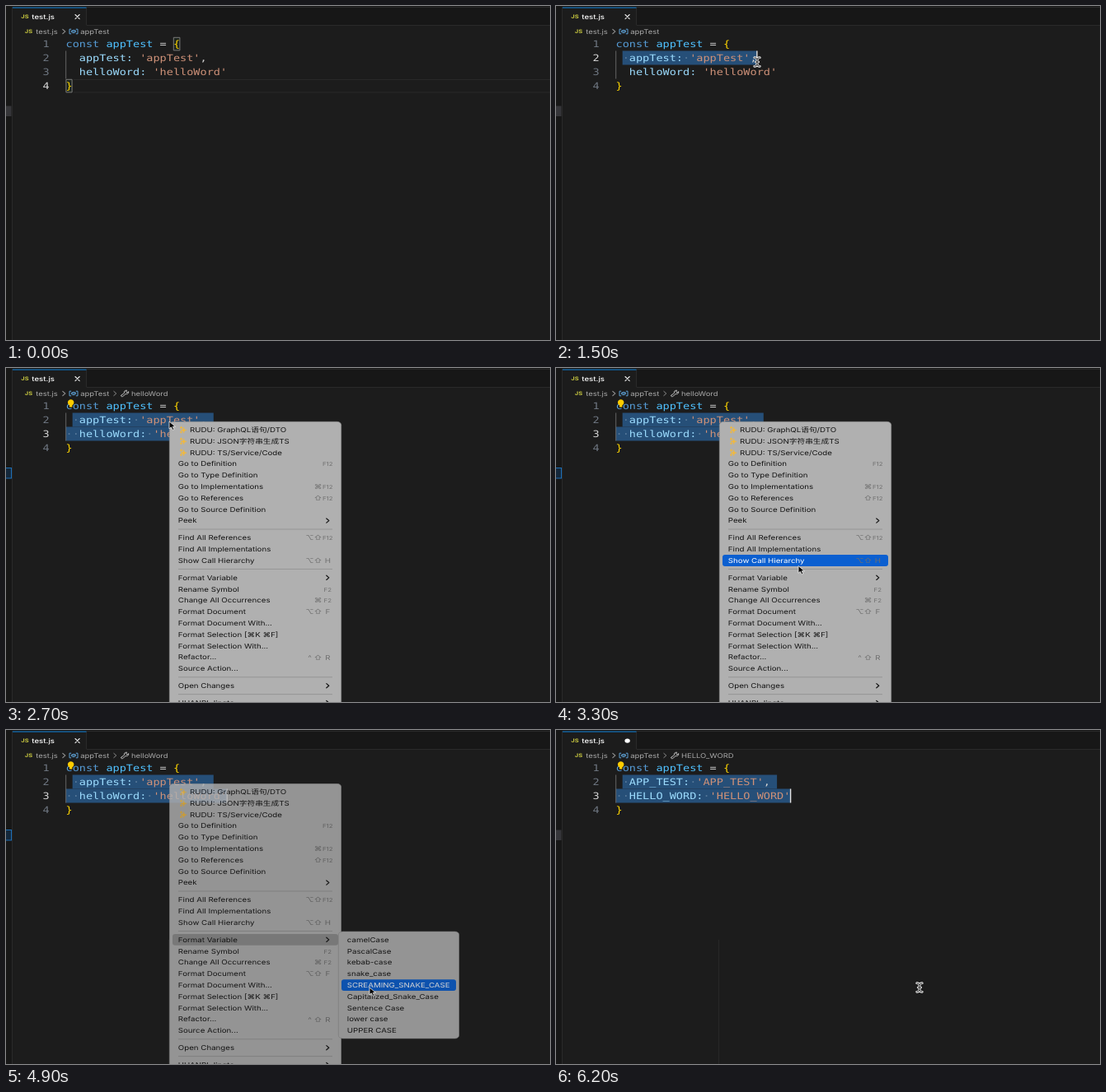
Animation of 660x406 px, one loop 6400 ms. Source, as an HTML page:

```html
<!DOCTYPE html>
<html lang="zh-CN">
<head>
<meta charset="utf-8">
<title>Format variable</title>
<style>
  html, body { margin: 0; width: 100%; height: 100%; overflow: hidden; background: #1c1c1c; }
  svg { display: block; width: 660px; height: 406px; }
  text { font: 400 8.15px Inter, "Noto Sans CJK SC", "Noto Sans CJK", "DejaVu Sans", sans-serif;
    fill: #141414; white-space: pre; text-rendering: geometricPrecision; }
  .code { font: 400 11.33px "DejaVu Sans Mono", monospace; }
  .js { font-size: 6.3px; font-weight: 700; fill: #cbcb41; }
  .tab { font-weight: 500; fill: #fff; font-size: 8px; }
  .crumb { fill: #a9a9a9; font-size: 7.9px; }
  .num { fill: #6e7681; }
  .num.on { fill: #d6d6d6; }
  .kw { fill: #569cd6; }
  .const { fill: #4fc1ff; }
  .op { fill: #d4d4d4; }
  .brace { fill: #ffd700; }
  .key { fill: #9cdcfe; }
  .str { fill: #ce9178; }
  .dot { fill: #9fb4c8; opacity: .45; }
  .keycap { fill: #6f6f6f; }
  .small { font-size: 6.6px; }
  .light { fill: #fff; }
  .line { fill: none; stroke-linecap: round; stroke-linejoin: round; }
  .panel { fill: #b0b0b0; stroke: #8b8b8b; stroke-width: .6; }
</style>
</head>
<body>
<svg viewBox="0 0 660 406">
  <rect width="660" height="406" fill="#1c1c1c"/>
  <rect width="660" height="23.5" fill="#171717"/>
  <rect width="7.5" height="406" fill="#171717"/>
  <path d="M7.5 1V406M8 1.5H660M98 23.5H660M97.5 2V23.5" stroke="#2a2a2a" fill="none"/>
  <rect x="8" y="2" width="89" height="22" fill="#1c1c1c"/>
  <rect x="8" y="1.5" width="89.5" height="1.1" fill="#0a74c6"/>
  <rect id="strip" x="-2" y="121.5" width="8.5" height="12.5"/>
  <path id="close" class="line" d="M84 10.5L89.2 15.7M89.2 10.5L84 15.7" stroke="#e8e8e8" stroke-width="1.1"/>
  <ellipse id="dirty" cx="86.6" cy="13.1" rx="3.2" ry="2.7" fill="#fff"/>
  <g id="head"></g>
  <g id="wrench" class="line" stroke="#bdbdbd" stroke-width="1">
    <path d="M130.8 28.4L133.8 31L130.8 33.6" stroke="#8c8c8c"/>
    <path d="M139.8 33.2L143.5 30.4C142.8 28.3 144.6 26.8 147 27.3L145.4 28.8L146.9 30L148.7 28.6C149.1 30.8 147.2 32.1 145.1 31.6L141.6 34.6C140.2 35.2 139.1 34.1 139.8 33.2Z"/>
  </g>
  <g id="idle" fill="none">
    <path d="M82 89.5H660M82 105H660" stroke="#292929"/>
    <path d="M203.3 38.3h7.6v15.6h-7.6zM72.9 89.3h7.2v15.6h-7.2z" stroke="#858585" stroke-width=".9" fill="#1d241d"/>
  </g>
  <g id="sel" fill="#264f78"></g>
  <path d="M72.7 54.5V88.5" stroke="#666"/>
  <g id="code"></g>
  <rect id="caret" width="1.4" height="17" fill="#e4e4e4"/>
  <path id="bulb" d="M77 47.6V45.3C73.8 43.6 74.4 38.4 78.7 38.3C83 38.4 83.6 43.6 80.4 45.3V47.6Z" fill="#ffcc00"/>
  <g id="menus">
    <rect class="panel" x="198.3" y="65.3" width="208.4" height="360" rx="5" ry="4"/>
    <rect id="hot" x="202" width="201" height="13.8" rx="3"/>
    <g id="main"></g>
    <g id="sub">
      <rect class="panel" x="403.3" y="245" width="146.4" height="130" rx="5" ry="4"/>
      <rect id="subHot" x="407" width="139" height="13.8" rx="3" fill="#0b5fd0"/>
      <g id="subRows"></g>
    </g>
  </g>
  <g id="beam" class="line">
    <path id="beamPath" d="M-3.2 -5.2Q0 -5.2 0 -3.2Q0 -5.2 3.2 -5.2M0 -3.2V3.2M-3.2 5.2Q0 5.2 0 3.2Q0 5.2 3.2 5.2M-1.5 0H1.5" stroke="#f2f2f2" stroke-width="2.5"/>
    <use href="#beamPath"/>
    <path d="M-3.2 -5.2Q0 -5.2 0 -3.2Q0 -5.2 3.2 -5.2M0 -3.2V3.2M-3.2 5.2Q0 5.2 0 3.2Q0 5.2 3.2 5.2M-1.5 0H1.5" stroke="#222" stroke-width="1"/>
  </g>
  <path id="arrow" d="M0 0V8.8L2.4 6.9L4.1 10.4L5.9 9.7L4.3 6.3H7.5Z" fill="#050505" stroke="#f4f4f4" stroke-width=".8"/>
</svg>
<script>
const LOOP = 6400, STEP = 100;
const WIDE = 1.195;              // the whole screen is drawn wider than tall
const COL = 8.15, LEFT = 72.5, TOP = 37.5, LINE = 17;
const ROW = 13.82, GAP = 7, BLUE = '#0b5fd0', GREY = '#8e8e8e';
const $ = id => document.getElementById(id);

const text = (x, y, str, cls = '', anchor = 'start') =>
  `<text class="${cls}" text-anchor="${anchor}" transform="translate(${x} ${y}) scale(${WIDE} 1)">${str}</text>`;
const show = (id, on) => { $(id).style.display = on ? '' : 'none'; };
const colX = col => LEFT + col * COL;
const lineY = line => TOP + (line - 1) * LINE;
const code = (line, col, str, cls) => text(colX(col), lineY(line) + 12.4, str, 'code ' + cls);
const chevron = (x, y, color, r = 2.6) =>
  `<path class="line" d="M${x - 1.5} ${y - r}L${x + 1.5} ${y}L${x - 1.5} ${y + r}" stroke="${color}" stroke-width="1.2"/>`;

// Pointer path: time, x, y
const path = [
  [100, 290, 352], [200, 270, 302], [300, 241, 238], [400, 208, 181], [500, 125, 104],
  [600, 88, 70], [700, 86, 67], [800, 90, 76], [900, 84, 67], [1000, 81, 64],
  [1100, 100, 64], [1400, 232, 66], [1500, 244, 68], [1600, 254, 75], [1800, 268, 86],
  [1900, 270, 84], [2100, 270.5, 79.5], [2400, 262, 77], [2600, 198, 65], [2900, 198, 65],
  [3000, 206, 80], [3100, 235, 140], [3200, 272, 206], [3300, 294, 240.5], [3400, 297, 251],
  [3600, 299, 255], [3700, 310, 255], [3800, 345, 255], [3900, 392, 255], [4000, 425, 256],
  [4100, 438.5, 259], [4200, 440, 275], [4300, 440, 297], [4400, 441, 304], [4600, 441, 313]
];

function pointer(t) {
  const i = path.findIndex(p => p[0] > t);
  if (i < 0) return path[path.length - 1].slice(1);
  if (i === 0) return path[0].slice(1);
  const [t0, x0, y0] = path[i - 1], [t1, x1, y1] = path[i];
  // rest where the hand pauses after the drag
  const k = t0 === 2100 ? (t < 2400 ? 0 : 1) : (t - t0) / (t1 - t0);
  return [x0 + (x1 - x0) * k, y0 + (y1 - y0) * k];
}

// Menu entries: label, shortcut or '>' for a submenu; null is a separator
const items = [
  ['*RUDU: GraphQL语句/DTO'], ['*RUDU: JSON字符串生成TS'], ['*RUDU: TS/Service/Code'],
  ['Go to Definition', 'F12'], ['Go to Type Definition'], ['Go to Implementations', '⌘ F12'],
  ['Go to References', '⇧ F12'], ['Go to Source Definition'], ['Peek', '>'], null,
  ['Find All References', '⌥ ⇧ F12'], ['Find All Implementations'], ['Show Call Hierarchy', '⌥ ⇧ H'], null,
  ['Format Variable', '>'], ['Rename Symbol', 'F2'], ['Change All Occurrences', '⌘ F2'],
  ['Format Document', '⌥ ⇧ F'], ['Format Document With...'], ['Format Selection [⌘K ⌘F]'],
  ['Format Selection With...'], ['Refactor...', '^ ⇧ R'], ['Source Action...'], null,
  ['Open Changes', '>'], null, ['HUANRI Jingta', '>']
];
const cases = ['camelCase', 'PascalCase', 'kebab-case', 'snake_case', 'SCREAMING_SNAKE_CASE',
  'Capitalized_Snake_Case', 'Sentence Case', 'lower case', 'UPPER CASE'];

const star = (x, y, r) =>
  `<path d="M${x} ${y - r}Q${x} ${y} ${x + r} ${y}Q${x} ${y} ${x} ${y + r}Q${x} ${y} ${x - r} ${y}Q${x} ${y} ${x} ${y - r}Z" fill="#f3b93a" stroke="#f3b93a" stroke-width=".5"/>`;

function shortcut(keys, y) {
  const parts = keys.split(' ');
  return parts.map((key, i) => {
    const x = [390.3, 378.5, 368.5][parts.length - 1 - i];
    return text(x, y + 3, key, key.length > 1 ? 'keycap small' : 'keycap', 'middle');
  }).join('');
}

const rows = [];
let mainHtml = '', cy = 75;
for (const item of items) {
  if (!item) {
    const y = cy - ROW / 2 + GAP / 2;
    mainHtml += `<path d="M209 ${y}H396" stroke="#929292" stroke-width=".9"/>`;
    cy += GAP;
    continue;
  }
  const [label, extra] = item, spark = label[0] === '*';
  mainHtml += '<g>';
  if (spark) mainHtml += star(215.6, cy + .5, 3.6) + star(212.6, cy - 2.6, 1.6) + star(212.4, cy + 3, 1.4);
  mainHtml += text(spark ? 223 : 208.8, cy + 2.9, spark ? label.slice(1) : label);
  if (extra === '>') mainHtml += chevron(390.3, cy, '#141414');
  else if (extra) mainHtml += shortcut(extra, cy);
  mainHtml += '</g>';
  rows.push({ y: cy, label });
  cy += ROW;
}
$('main').innerHTML = mainHtml;
const mainTexts = [...$('main').querySelectorAll('g')].map(g => g.querySelector('text'));
const parent = rows.findIndex(r => r.label === 'Format Variable');
const subY = i => rows[parent].y + i * ROW;
$('subRows').innerHTML = cases.map((c, i) => text(413.8, subY(i) + 2.9, c)).join('');
const subTexts = [...$('subRows').children];

const rowAt = (list, y) => list.findIndex(c => Math.abs(y - c) <= ROW / 2);

function drawHead(prop) {
  $('head').innerHTML =
    text(18.3, 15.3, 'JS', 'js') + text(31.3, 15.9, 'test.js', 'tab') +
    text(22.8, 33.3, 'JS', 'js') + text(36.2, 33.9, 'test.js', 'crumb') + chevron(70.3, 31, '#8c8c8c') +
    `<path class="line" d="M78.8 28.2H77V33.8H78.8M85.2 28.2H87V33.8H85.2M79.8 30.3L82.2 29.2L84.3 30.2V31.8L81.9 32.9L79.8 31.9ZM79.8 30.3L81.9 31.3L84.3 30.2" stroke="#65aee8" stroke-width=".9"/>` +
    text(90.2, 33.9, 'appTest', 'crumb') + (prop ? text(152, 33.9, prop, 'crumb') : '');
  show('wrench', !!prop);
}

function drawCode(names, head) {
  const active = head ? head.line : 4;
  let html = '', sel = '';
  for (let n = 1; n <= 4; n++)
    html += text(44.4, lineY(n) + 12.4, n, 'code num' + (n === active ? ' on' : ''));
  html += code(1, 0, 'const', 'kw') + code(1, 6, 'appTest', 'const') + code(1, 14, '=', 'op') +
    code(1, 16, '{', 'brace') + code(4, 0, '}', 'brace');
  names.forEach((name, i) => {
    const line = i + 2, end = 2 + name.length;
    html += code(line, 2, name + ':', 'key') + code(line, end + 2, `'${name}'`, 'str');
    if (line === 2) html += code(2, end + 4 + name.length, ',', 'op');
    if (!head || line > head.line) return;
    const from = line === 2 ? 1 : 0;
    const to = line === head.line ? head.col : 2 * name.length + 8;
    if (to <= from) return;
    sel += `<rect x="${colX(from)}" y="${lineY(line)}" width="${(to - from) * COL}" height="${LINE}"/>`;
    for (const c of [0, 1, end + 1]) if (c >= from && c < to) html += code(line, c, '·', 'dot');
  });
  $('code').innerHTML = html;
  $('sel').innerHTML = sel;
  if (head) {
    $('caret').setAttribute('x', colX(head.col) - .5);
    $('caret').setAttribute('y', lineY(head.line));
  }
}

function dragHead(x, y) {
  const line = y > lineY(3) ? 3 : 2;
  const col = Math.round((x - LEFT) / COL);
  return { line, col: Math.max(0, Math.min(line === 3 ? 24 : 21, col)) };
}

function render(t) {
  const [x, y] = pointer(t);
  const done = t >= 5200, menu = t >= 2600 && !done, sub = t >= 3500;
  const names = done ? ['APP_TEST', 'HELLO_WORD'] : ['appTest', 'helloWord'];
  const head = t < 1000 ? null
    : done ? { line: 3, col: 26 }
    : t < 2100 ? dragHead(x, y) : { line: 3, col: 24 };

  drawHead(t >= 5500 ? 'HELLO_WORD' : t >= 1800 ? 'helloWord' : '');
  drawCode(names, head);
  show('idle', !head);
  show('caret', head && !(t >= 5700 && t < 6200));
  show('bulb', t >= 2200);
  show('close', !done);
  show('dirty', done);
  $('strip').setAttribute('fill', menu ? '#14283c' : '#36363a');
  $('strip').setAttribute('stroke', menu ? '#1c6fb8' : 'none');

  show('menus', menu);
  show('sub', sub);
  $('menus').setAttribute('opacity', Math.max(0, Math.min(1, (5145 - t) / 300)));
  const inSub = sub && x > 404;
  const hot = inSub ? parent : menu && t >= 3000 ? rowAt(rows.map(r => r.y), y) : -1;
  const pick = inSub ? rowAt(cases.map((c, i) => subY(i)), y) : -1;
  show('hot', hot >= 0);
  show('subHot', pick >= 0);
  if (hot >= 0) {
    $('hot').setAttribute('y', rows[hot].y - ROW / 2);
    $('hot').setAttribute('fill', inSub ? GREY : BLUE);
  }
  if (pick >= 0) $('subHot').setAttribute('y', subY(pick) - ROW / 2);
  mainTexts.forEach((el, i) => el.classList.toggle('light', i === hot && !inSub));
  subTexts.forEach((el, i) => el.classList.toggle('light', i === pick));

  show('arrow', menu);
  show('beam', !menu && t >= 100);
  $(menu ? 'arrow' : 'beam').setAttribute('transform', `translate(${x} ${y})`);
}

let last = -1;
function tick() {
  const t = Math.floor(performance.now() % LOOP / STEP) * STEP;
  if (t !== last) render(last = t);
  requestAnimationFrame(tick);
}
tick();
</script>
</body>
</html>
```
